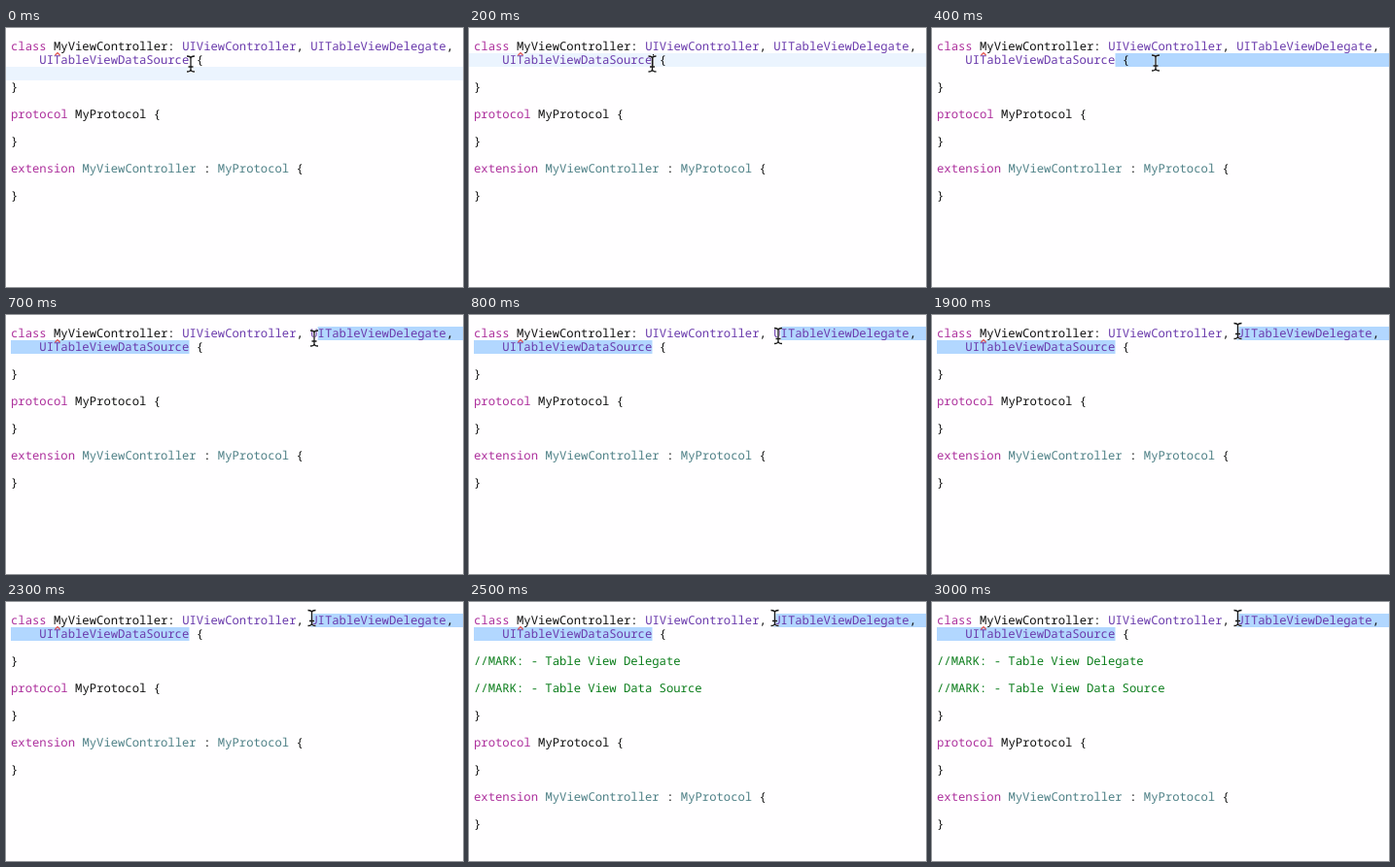
These frames come from a looping animation (470 by 267 pixels, 3100 ms). An HTML page with a canvas:

```html
<!DOCTYPE html>
<html lang="en">
<head>
<meta charset="utf-8">
<title>Selecting code</title>
<style>
  html, body { margin: 0; width: 100%; height: 100%; overflow: hidden; background: #fffeff; }
  canvas { display: block; width: 470px; height: 267px; }
</style>
</head>
<body>
<canvas id="stage" width="470" height="267"></canvas>
<script>
const ctx = document.getElementById('stage').getContext('2d');
const WIDTH = 470, HEIGHT = 267;
const LOOP = 3100, STEP = 100;
const LEFT = 5, CHAR = 7.34, TOP = 12, PITCH = 14.05, BASELINE = 10.7;

const PAPER = '#fffeff', CURRENT = '#ebf4fe', SELECTED = '#b2d7ff';
const KEYWORD = '#ad2f9c', SYSTEM = '#6a3aac', OWN = '#4f8187', COMMENT = '#0b7d1b', PLAIN = '#111';

const CLICK = 200, DRAG = 300, INSERT = 2400;
const ANCHOR_COL = 25;

// Pointer path: time, x, y
const PATH = [
  [0, 190, 37], [200, 188.5, 37], [300, 203, 37], [400, 230, 36],
  [600, 300, 30], [700, 317, 24], [800, 318, 21.5], [1000, 314.5, 16.5]
];

const HEAD = [
  [['class', KEYWORD], [' MyViewController: ', PLAIN], ['UIViewController', SYSTEM],
   [', ', PLAIN], ['UITableViewDelegate', SYSTEM], [',', PLAIN]],
  [['    UITableViewDataSource', SYSTEM], [' {', PLAIN]],
  []
];
const MARKS = [
  [['//MARK: - Table View Delegate', COMMENT]], [],
  [['//MARK: - Table View Data Source', COMMENT]], []
];
const TAIL = [
  [['}', PLAIN]], [],
  [['protocol', KEYWORD], [' MyProtocol {', PLAIN]], [],
  [['}', PLAIN]], [],
  [['extension', KEYWORD], [' MyViewController', OWN], [' : ', PLAIN],
   ['MyProtocol', OWN], [' {', PLAIN]], [],
  [['}', PLAIN]]
];

const colX = col => LEFT + col * CHAR;
const rowY = row => TOP + row * PITCH;

function fillRow(row, from, to, color) {
  const y = Math.round(rowY(row));
  ctx.fillStyle = color;
  ctx.fillRect(from, y, to - from, Math.round(rowY(row + 1)) - y);
}

function pointerAt(t) {
  const next = PATH.findIndex(p => p[0] > t);
  if (next < 0) return PATH[PATH.length - 1].slice(1);
  const a = PATH[next - 1], b = PATH[next];
  const k = (t - a[0]) / (b[0] - a[0]);
  return [a[1] + (b[1] - a[1]) * k, a[2] + (b[2] - a[2]) * k];
}

function drawSelection(t, x, y) {
  const anchor = colX(ANCHOR_COL);
  if (t < CLICK) return fillRow(2, 0, WIDTH, CURRENT);
  if (t < DRAG) {
    fillRow(1, 0, WIDTH, CURRENT);
    ctx.fillStyle = PLAIN;
    ctx.fillRect(Math.round(anchor), 27, 1, 12);
    return;
  }
  const col = Math.round((x - LEFT) / CHAR);
  if (y < rowY(1)) {
    fillRow(0, colX(col), WIDTH, SELECTED);
    fillRow(1, LEFT, anchor, SELECTED);
  } else {
    // Past the closing brace the selection runs to the edge
    fillRow(1, anchor, col > 27 ? WIDTH : colX(col), SELECTED);
  }
}

function drawCode(lines) {
  ctx.font = '12.23px "Noto Sans Mono", "DejaVu Sans Mono", monospace';
  ctx.textRendering = 'geometricPrecision';
  lines.forEach((runs, row) => {
    let col = 0;
    for (const [text, color] of runs) {
      ctx.fillStyle = color;
      ctx.fillText(text, colX(col), rowY(row) + BASELINE);
      col += text.length;
    }
  });
}

function drawErrorMark() {
  ctx.strokeStyle = '#e2524b';
  ctx.lineWidth = 1.2;
  ctx.beginPath();
  ctx.moveTo(50.5, 28);
  ctx.lineTo(53, 25.5);
  ctx.lineTo(55.5, 28);
  ctx.stroke();
}

function drawPointer(x, y) {
  const beam = new Path2D();
  for (const side of [-1, 1]) {
    for (const end of [-1, 1]) {
      beam.moveTo(x + side * 4, y + end * 8);
      beam.quadraticCurveTo(x, y + end * 8, x, y + end * 5.5);
    }
  }
  beam.moveTo(x, y - 6);
  beam.lineTo(x, y + 6);
  beam.moveTo(x - 2.5, y + 3);
  beam.lineTo(x + 2.5, y + 3);
  ctx.strokeStyle = 'rgba(255, 255, 255, 0.7)';
  ctx.lineWidth = 2.6;
  ctx.stroke(beam);
  ctx.strokeStyle = '#1a1a1a';
  ctx.lineWidth = 1.3;
  ctx.stroke(beam);
}

function draw(now) {
  const t = Math.floor((now % LOOP) / STEP) * STEP;
  const [x, y] = pointerAt(t);
  ctx.fillStyle = PAPER;
  ctx.fillRect(0, 0, WIDTH, HEIGHT);
  drawSelection(t, x, y);
  drawCode([...HEAD, ...(t < INSERT ? [] : MARKS), ...TAIL]);
  drawErrorMark();
  drawPointer(x, y);
}

let start;
function tick(now) {
  start ??= now;
  draw(now - start);
  requestAnimationFrame(tick);
}
draw(0);
requestAnimationFrame(tick);
</script>
</body>
</html>
```
